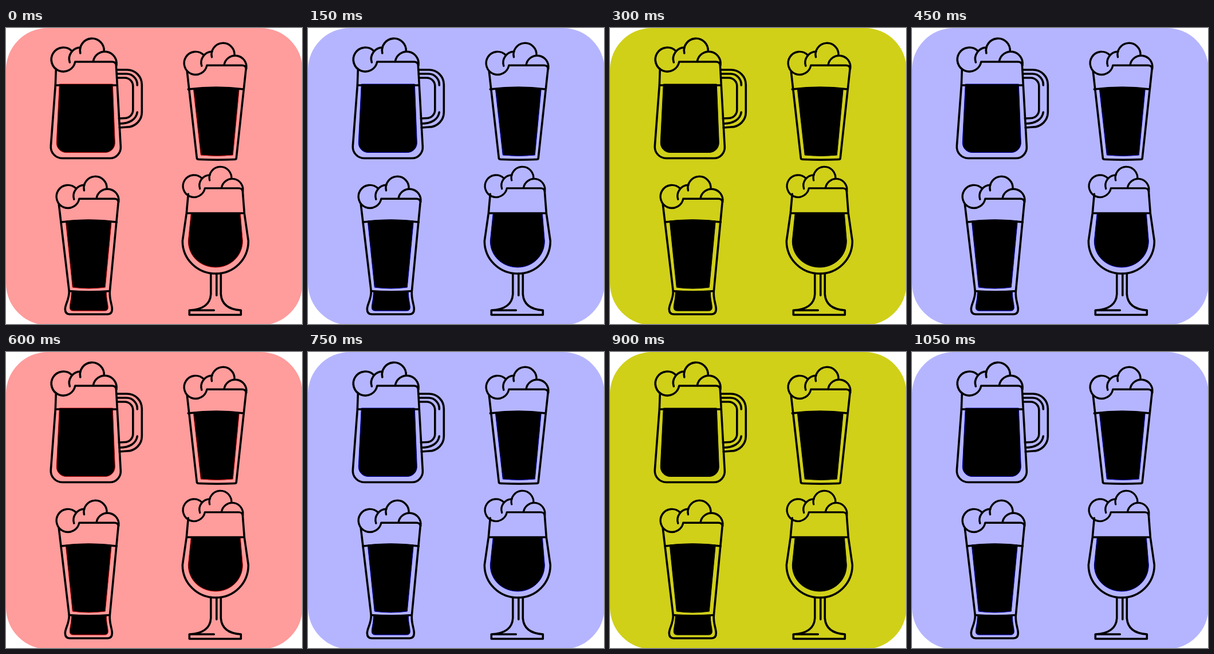
An HTML page for the animation above (1.2 s loop, 517 by 517 pixels).

```html
<!DOCTYPE html>
<html lang="en">
<head>
<meta charset="utf-8">
<title>Beer glasses</title>
<style>
  html, body { margin: 0; width: 100%; height: 100%; overflow: hidden; background: #fff; }
  svg { display: block; width: 100vw; height: 100vh; }
  .line { fill: none; stroke: #000; stroke-width: 3.6; stroke-linecap: round; stroke-linejoin: round; }
  .line path { vector-effect: non-scaling-stroke; }
  .drink { fill: #000; stroke-width: 1; }
</style>
</head>
<body>
<svg viewBox="0 0 517 517">
  <defs>
    <g id="foam">
      <path d="M36.500 21A21 21 0 1 0 42.500 40H107Q113 40 114.500 46"/>
      <path d="M33 41A20 20 0 0 1 52 15"/>
      <path d="M51.500 25A21 21 0 1 1 92.900 22"/>
      <path d="M74 39.500A20.500 20.500 0 0 1 114.500 46"/>
    </g>
  </defs>
  <rect id="card" width="518" height="519" rx="73"/>

  <g transform="translate(-.7 0)">
    <g id="drinks" class="drink">
      <path d="M94 98H187L191 200A17 17 0 0 1 174 217.500H105A17 17 0 0 1 89 199Z"/>
      <path d="M328 106Q368 101 408 106L397 222Q370 225 341 222Z"/>
      <path d="M105 337Q145 333 185 337L174 453Q145 457 117 453Z"/>
      <path d="M115 460Q146 463 176 460C176 474 179 482 179 488Q179 494 173 494H118Q112 494 112 488C112 482 115 474 115 460Z"/>
      <path d="M324 323.500H410L414 372C414 398 393 418 367 418C340 418 319 398 319 372Z"/>
    </g>

    <g class="line">
      <use href="#foam" x="79" y="19"/>
      <path d="M88 72L87 100L79 206A20 20 0 0 0 99 227.500H182A19 19 0 0 0 201 207L193 64M87 100H194"/>
      <path d="M194 73H212A26 26 0 0 1 238 99V147A26 26 0 0 1 212 173L199 174"/>
      <path d="M195 80H211A19 19 0 0 1 230 100M199 167C216 167 228 160 230 147"/>
      <path d="M196 87H208A14.500 14.500 0 0 1 222.500 101.500V143A14.500 14.500 0 0 1 208 157.500L198 158"/>

      <use href="#foam" transform="translate(311 27) scale(.955)"/>
      <path d="M317 76L334 227Q334 229.500 338 229.500Q370 231 400 229.500Q403 229.500 403 227L420 70M319 107Q368 101 416 107"/>

      <use href="#foam" transform="translate(88 260) scale(.955)"/>
      <path d="M93 308L111 460C111 475 104 482 104 491Q104 500 112 500H178Q186 500 186 491C186 482 181 475 182 460L197 303"/>
      <path d="M97 339Q145 333 194 339M111 459.500Q146 462 182 459.500"/>

      <use href="#foam" transform="translate(309 243) scale(.92)"/>
      <path d="M319 290L316 323.500L309 372C309 404 335 429 367 429C399 429 424 404 424 372L417 323.500L414 284M316 323.500H417"/>
      <path d="M358.500 429V465Q357 491 321 493V501H411V493Q378 491 376 465V429M368.500 429V467M321 493H364"/>
    </g>
  </g>
</svg>
<script>
  const STEP = 150;
  const pink = ['#ff9c9c', '#c00000'];
  const blue = ['#b5b5ff', '#0000b0'];
  const lime = ['#d0d019', '#000000'];
  const cycle = [pink, blue, lime, blue, pink, blue, lime, blue];
  const card = document.getElementById('card');
  const drinks = document.getElementById('drinks');

  function draw(ms) {
    const [fill, edge] = cycle[Math.floor(ms / STEP) % cycle.length];
    card.setAttribute('fill', fill);
    drinks.setAttribute('stroke', edge);
  }

  const start = performance.now();
  function tick() {
    draw(performance.now() - start);
    requestAnimationFrame(tick);
  }
  tick();
</script>
</body>
</html>
```
